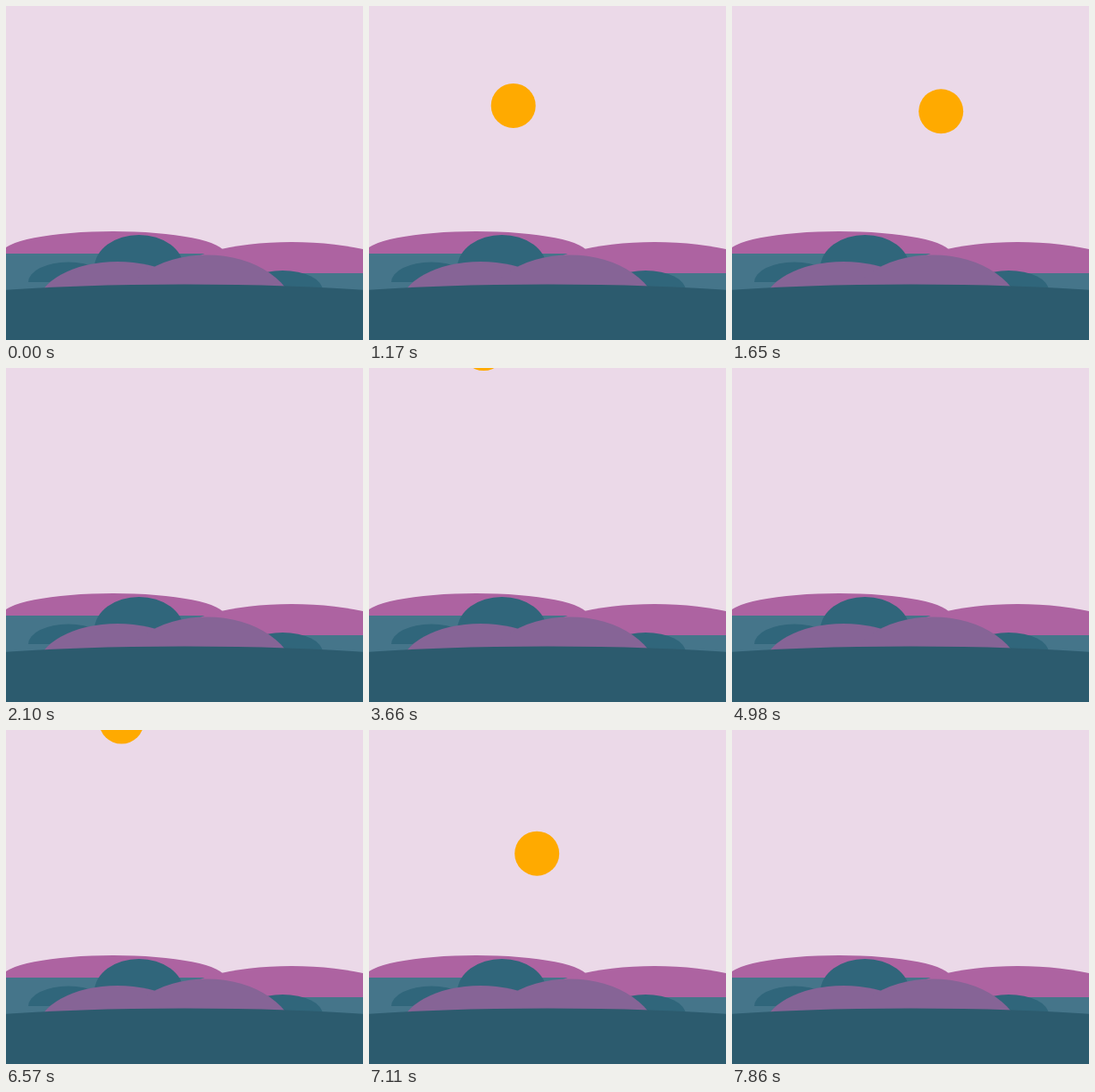
Write an HTML page with a canvas that moves like this. It is 400x375 px and loops after 9000 ms.

```html
<!DOCTYPE html>
<html lang="en">
<head>
<meta charset="utf-8">
<title>Sun over hills</title>
<style>
html, body { margin: 0; width: 100%; height: 100%; overflow: hidden; background: #ebd9e8; }
canvas { display: block; }
</style>
</head>
<body>
<canvas id="stage" width="400" height="375"></canvas>
<script>
const ctx = document.getElementById('stage').getContext('2d');
const W = 400, H = 375;
const LOOP = 9000, STEP = 30;
const TURN = 2880, LOWEST = 1425;

const PINK = '#ad63a1', WATER = '#45758a', BUSH = '#30667b';
const MAUVE = '#866496', GROUND = '#2c5b6e';

function rect(color, x, y, w, h) {
  ctx.fillStyle = color;
  ctx.fillRect(x, y, w, h);
}

// Upper half of an ellipse standing on its base line.
function dome(color, x, base, rx, ry) {
  ctx.fillStyle = color;
  ctx.beginPath();
  ctx.ellipse(x, base, rx, ry, 0, Math.PI, 2 * Math.PI);
  ctx.fill();
}

// The sun swings round a tall ellipse centred above the stage.
function sun(t) {
  const a = (t - LOWEST) / TURN * 2 * Math.PI;
  ctx.fillStyle = '#ffaa00';
  ctx.beginPath();
  ctx.arc(200 + 72.5 * Math.sin(a), -53.7 + 195 * Math.cos(a), 25, 0, 2 * Math.PI);
  ctx.fill();
}

function land() {
  dome(PINK, 120, 278, 125, 25);
  rect(WATER, 0, 278, W, H - 278);
  dome(PINK, 320, 300, 125, 35);
  dome(BUSH, 70, 310, 45, 22.5);
  dome(BUSH, 149, 294, 50, 37);
  dome(BUSH, 310, 319.5, 45, 22.5);
  dome(MAUVE, 125, 337, 90, 50);
  dome(MAUVE, 225, 349.5, 100, 70);
  dome(GROUND, 200, 337.5, 300, 25);
  rect(GROUND, 0, 337, W, H - 337);
}

function draw(t) {
  rect('#ebd9e8', 0, 0, W, H);
  sun(t);
  land();
}

const start = performance.now();
function tick() {
  const t = (performance.now() - start) % LOOP;
  draw(Math.floor(t / STEP) * STEP);
  requestAnimationFrame(tick);
}
tick();
</script>
</body>
</html>
```
